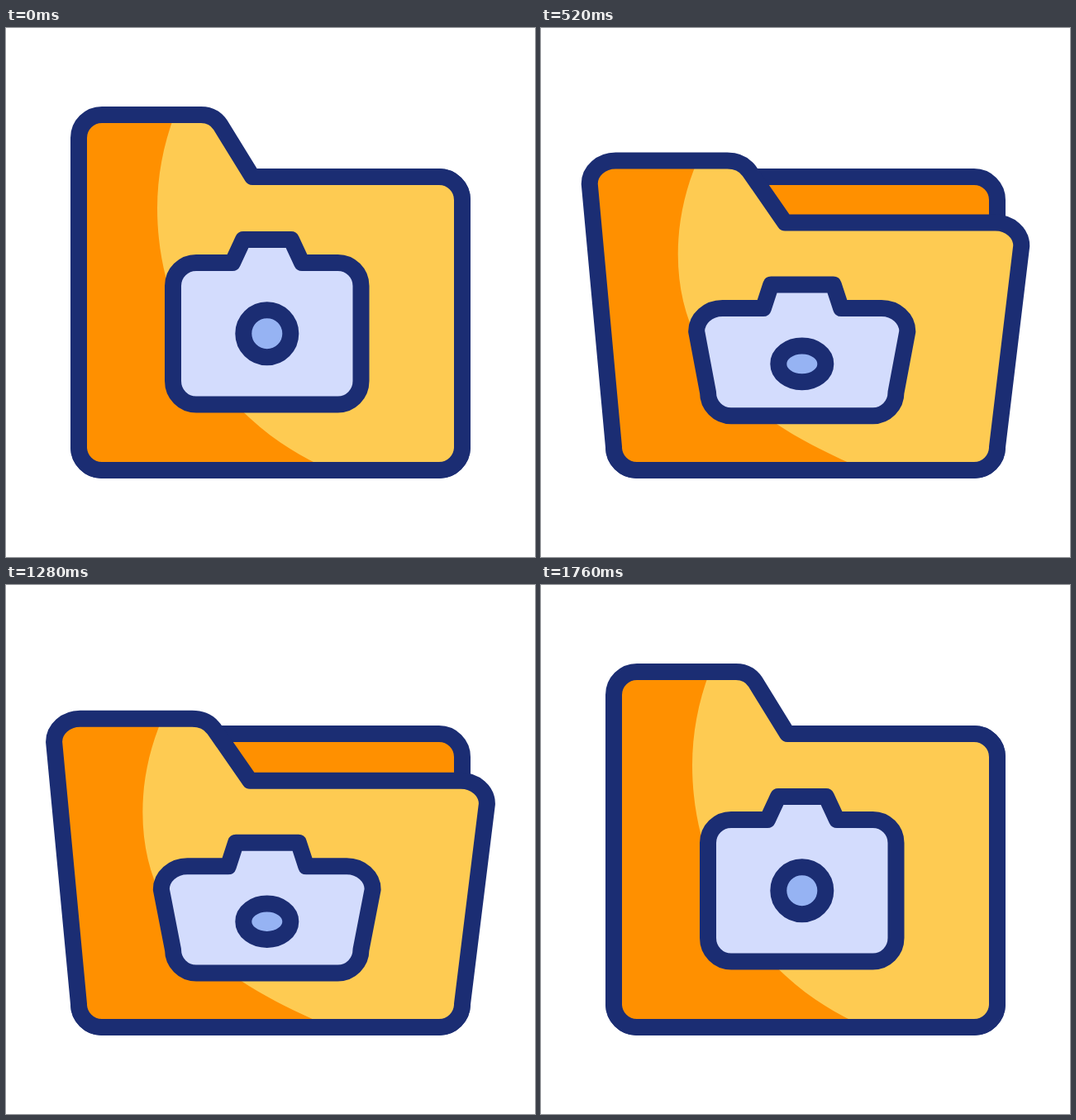
Recreate the animation shown at these times as an HTML page. Size 640 by 640 pixels, loop 2.12 s.

```html
<!DOCTYPE html>
<html lang="en">
<head>
<meta charset="utf-8">
<title>Photo folder</title>
<style>
  html, body { margin: 0; width: 100%; height: 100%; overflow: hidden; background: #fff; }
  svg { display: block; width: 100vw; height: 100vh; }
  .line { stroke: #1b2d73; stroke-width: 20; stroke-linejoin: round; }
</style>
</head>
<body>
<svg viewBox="0 0 640 640">
  <rect class="line" x="88" y="180" width="464" height="355" rx="28" fill="#ff9000"/>
  <rect class="line" id="sheet" x="119" y="0" width="399" height="284" fill="#fff"/>
  <path id="flap" fill="#fecb52"/>
  <path id="shade" fill="#ff9000"/>
  <path class="line" id="edge" fill="none"/>
  <path class="line" id="camera" fill="#d3dcfd"/>
  <ellipse class="line" id="lens" cx="315.8" rx="28.5" fill="#96b3f3"/>
</svg>
<script>
const LOOP = 2120, STEP = 40, TILT = 525;
const $ = id => document.getElementById(id);
const set = (id, attrs) => {
  for (const k in attrs) $(id).setAttribute(k, attrs[k]);
};
const [sheet, flap, shade, edge, camera, lens] =
  ['sheet', 'flap', 'shade', 'edge', 'camera', 'lens'];

const clamp = u => Math.min(1, Math.max(0, u));
const swing = u => 0.5 - 0.5 * Math.cos(Math.PI * clamp(u));

// Points that spread from cx and sink by dy as the flap opens
const mover = (cx, spread, dy, p) => (x, y) =>
  `${(cx + (x - cx) * (1 + spread * p)).toFixed(2)},${(y + dy * p).toFixed(2)} `;

function drawFlap(p) {
  const t = mover(320, 0.142, 62.5, p);
  const corner = `C${t(88, 117.5)}${t(100.5, 105)}${t(116, 105)}`;
  const foot = 'L116,535 C100.5,535 88,522.5 88,507 Z';
  const d = `M${t(88, 133)}${corner}L${t(236, 105)}` +
    `C${t(246, 105)}${t(254, 109)}${t(259.5, 117.5)}L${t(298, 180)}L${t(524, 180)}` +
    `C${t(539.5, 180)}${t(552, 192.5)}${t(552, 208)}` +
    `L552,507 C552,522.5 539.5,535 524,535 ${foot}`;
  set(flap, { d });
  set(edge, { d });
  set(shade, {
    d: `M${t(88, 133)}${corner}L${t(204, 105)}` +
      `C${t(190, 142)}${t(183, 180)}${t(183, 218)}` +
      `C${t(183, 356.5)}266.4,481.5 393.4,535 ${foot}`
  });
}

function drawCamera(p) {
  const t = mover(315.8, 0.137, 62, p);
  const bump = mover(316, 0.34, 61.5, p);
  const b = mover(316, 0, 15.5, p);
  set(camera, {
    d: `M${t(202, 312)}C${t(202, 296.5)}${t(214.5, 284)}${t(230, 284)}` +
      `L${t(274, 284)}L${bump(287, 256)}L${bump(345, 256)}L${t(358, 284)}L${t(401.5, 284)}` +
      `C${t(417, 284)}${t(429.5, 296.5)}${t(429.5, 312)}` +
      `L${b(429.5, 427)}C${b(429.5, 443)}${b(417, 455.5)}${b(401.5, 455.5)}` +
      `L${b(230, 455.5)}C${b(214.5, 455.5)}${b(202, 443)}${b(202, 427)}Z`
  });
  set(lens, { cy: 369.7 + 41.3 * p, ry: 28.5 - 7.5 * p });
}

function drawSheet(t) {
  const left = Math.max(0, (1161 - t) / 281);
  set(sheet, { y: 246 - 75 * left ** 4 });
}

const start = performance.now();
function frame() {
  const t = Math.floor(((performance.now() - start) % LOOP) / STEP) * STEP;
  const open = t <= 120 ? 0 : swing((t - 109) / TILT) - swing((t - 1177) / TILT);
  drawSheet(t);
  drawFlap(open);
  drawCamera(open);
  requestAnimationFrame(frame);
}
frame();
</script>
</body>
</html>
```
